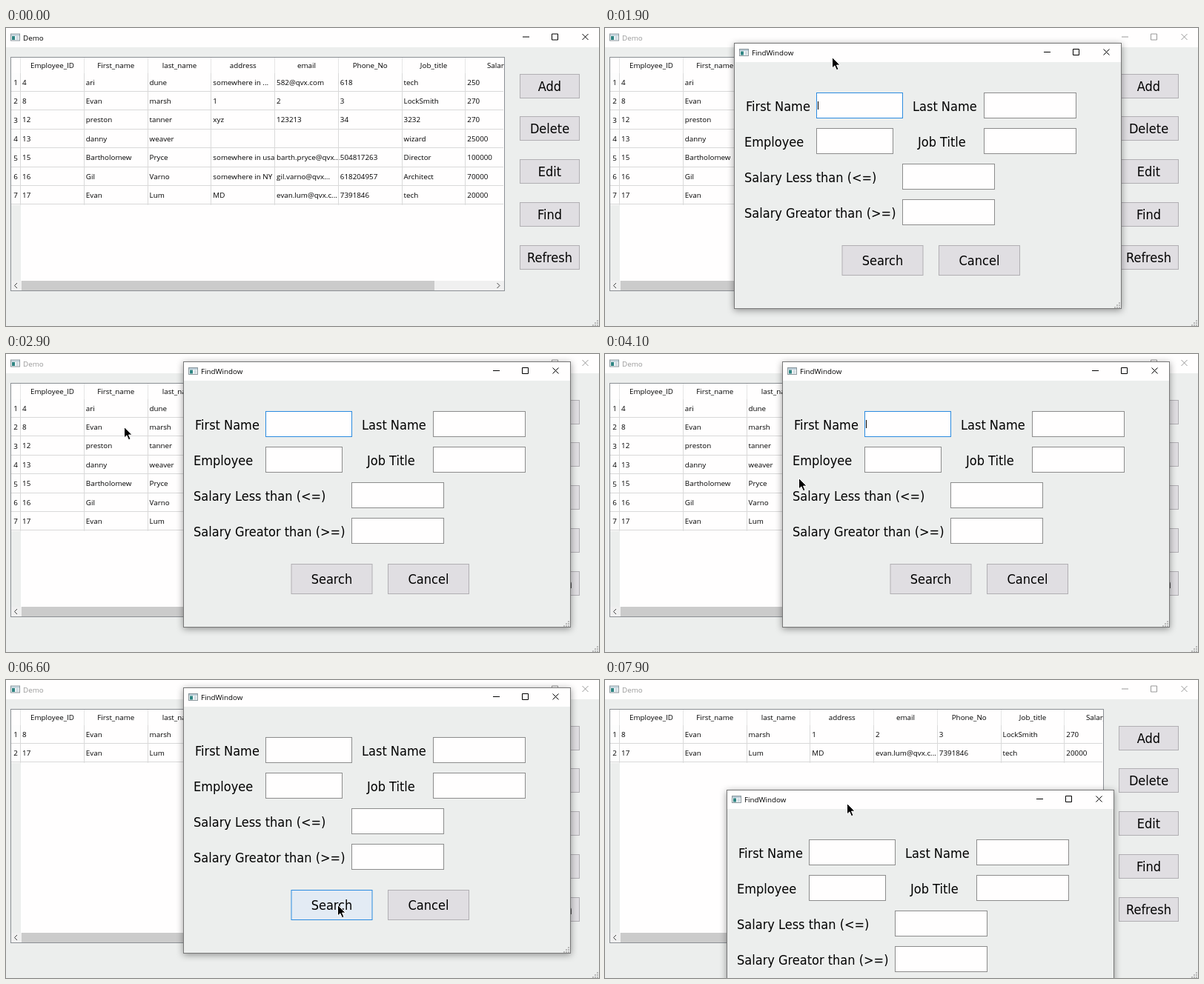
An HTML page that plays this animation: 800x402 px, repeating every 8000 ms.

```html
<!DOCTYPE html>
<html lang="en">
<head>
<meta charset="utf-8">
<title>Demo</title>
<style>
  html, body { margin: 0; width: 100%; height: 100%; overflow: hidden; background: #eceeed; }
  svg { display: block; }
  text { white-space: pre; }
  .small { font: 9.8px "Open Sans", "Noto Sans", sans-serif; }
  .big { font: 18px "DejaVu Sans Condensed", "Noto Sans", sans-serif; }
  .typed { font: 8.5px "DejaVu Sans Condensed", "Noto Sans", sans-serif; }
  .mid { text-anchor: middle; }
  .shadow { filter: drop-shadow(0 2px 5px rgba(0, 0, 0, .4)); }
</style>
</head>
<body>
<svg id="stage" width="800" height="402" viewBox="0 0 800 402"></svg>
<script>
const LOOP = 8000, STEP = 100;
const OPEN = 700, TYPE = 5000, CLICK = 6300, FILTER = 6500, BLINK = 530;
const BLUE = '#2b8be0', EDGE = '#8c8c8c', BUTTON = '#e0dee2', BUTTON_EDGE = '#b1afb3';
const PAPER = '#fffefe', FACE = '#eceeed', TYPED = 'Evan';

const HEADERS = ['Employee_ID', 'First_name', 'last_name', 'address', 'email', 'Phone_No', 'Job_title', 'Salary'];
const ROWS = [
  ['4', 'ari', 'dune', 'somewhere in ...', '582@qvx.com', '618', 'tech', '250'],
  ['8', 'Evan', 'marsh', '1', '2', '3', 'LockSmith', '270'],
  ['12', 'preston', 'tanner', 'xyz', '123213', '34', '3232', '270'],
  ['13', 'danny', 'weaver', '', '', '', 'wizard', '25000'],
  ['15', 'Bartholomew', 'Pryce', 'somewhere in usa', 'barth.pryce@qvx...', '504817263', 'Director', '100000'],
  ['16', 'Gil', 'Varno', 'somewhere in NY', 'gil.varno@qvx...', '618204957', 'Architect', '70000'],
  ['17', 'Evan', 'Lum', 'MD', 'evan.lum@qvx.c...', '7391846', 'tech', '20000']
];

// dialog drags: time, x, y
const DRAG = [
  [1800, 139, 22], [1900, 174, 20], [2300, 239, 10],
  [7200, 239, 10], [7500, 213, 62], [7900, 164, 148]
];
// pointer moves, measured from the dialog corner: start, end, x, y
const MOVES = [
  [100, 400, 597, 234], [600, 1000, 215, 159], [1000, 1700, 133, 20], [2300, 2900, -79, 89],
  [3000, 3500, -89, 220], [3700, 4600, 180, 71], [5800, 6200, 209, 294], [6600, 7100, 163, 19]
];

const stage = document.getElementById('stage');

function add(parent, tag, attrs = {}, text) {
  const el = document.createElementNS('http://www.w3.org/2000/svg', tag);
  for (const k in attrs) el.setAttribute(k, attrs[k]);
  if (text !== undefined) el.textContent = text;
  return parent.appendChild(el);
}
const label = (p, x, y, s, cls = 'small', fill = '#000') => add(p, 'text', { x, y, class: cls, fill }, s);
const rect = (p, x, y, width, height, fill, stroke = 'none') =>
  add(p, 'rect', { x, y, width, height, fill, stroke });
const path = (p, d, stroke, fill = 'none') => add(p, 'path', { d, stroke, fill });
const show = (el, on) => el.setAttribute('visibility', on ? 'visible' : 'hidden');
const move = (el, x, y) => el.setAttribute('transform', `translate(${x} ${y})`);

function button(p, x, y, w, h, s) {
  const box = rect(p, x + .5, y + .5, w, h, BUTTON, BUTTON_EDGE);
  label(p, x + w / 2 + .5, y + h / 2 + 7, s, 'big mid');
  return box;
}

function titleBar(p, x, y, name, controls) {
  rect(p, x + .5, y - 4.5, 12, 9, '#f4f7f8', '#8b979d');
  rect(p, x + 1, y - 4, 11, 2, '#b9cbd6');
  rect(p, x + 2, y - 1.5, 4, 5, '#2f8583');
  rect(p, x + 7.5, y - 1.5, 3.5, 5, '#d3dde4');
  const g = add(p, 'g', { color: '#000' });
  label(g, x + 17, y + 4, name, 'small', 'currentColor');
  const c = controls, t = y - 4.5;
  path(g, `M${c} ${y - .5}h9M${c + 39.5} ${t}h8v8h-8zM${c + 80.5} ${t}l8 8m0-8l-8 8`, 'currentColor');
  return g;
}

function grip(p, x, y) {
  for (let r = 0; r < 3; r++)
    for (let c = 0; c <= r; c++) rect(p, x - 2 - c * 3, y - 8 + r * 3, 2, 2, '#b8b8b8');
}

const colX = c => 19.6 + 85.75 * c;
const colLine = (p, c, top, end, stroke) => path(p, `M${Math.floor(colX(c)) + .5} ${top}V${end}`, stroke);

function tableRows(p, list) {
  const g = add(p, 'g'), top = 61, pitch = 25.4, end = top + pitch * list.length;
  rect(g, 7, top, 13, end - top, '#fdfdfd');
  list.forEach((cells, r) => {
    const y = top + pitch * r;
    label(g, 13, y + 16, r + 1, 'small mid');
    cells.forEach((s, c) => label(g, colX(c) + 2.5, y + 15.6, s));
    path(g, `M7 ${Math.floor(y + pitch) - .5}H671`, '#d9d9d9');
  });
  HEADERS.forEach((_, c) => colLine(g, c, top, end, '#d9d9d9'));
  return g;
}

// main window
rect(stage, 0, 0, 800, 402, FACE);
rect(stage, 0, 0, 800, 26, PAPER);
const mainTitle = titleBar(stage, 6, 12.5, 'Demo', 697);
grip(stage, 799, 402);
rect(stage, 6.5, 39.5, 666, 315, PAPER, '#8b8f94');
const view = add(stage, 'svg', { x: 7, y: 40, width: 665, height: 314, viewBox: '7 40 665 314' });
rect(view, 7, 61, 13, 280, FACE);
HEADERS.forEach((s, c) => {
  label(view, colX(c) + 42.9, 54, s, 'small mid');
  colLine(view, c, 40, 61, '#e6e6e6');
});
const allRows = tableRows(view, ROWS);
const foundRows = tableRows(view, ROWS.filter(r => r[1] === TYPED));
rect(view, 7, 341, 665, 13, '#f0f0f0');
rect(view, 21, 341, 557, 13, '#cbcbcb');
path(view, 'M15 344l-3.5 3.5 3.5 3.5M662.5 344l3.5 3.5-3.5 3.5', '#444');
const findButton = ['Add', 'Delete', 'Edit', 'Find', 'Refresh']
  .map((s, i) => button(stage, 693, Math.round(61.6 + 57.8 * i), 80, 32, s))[3];

// find dialog
const dialog = add(stage, 'g');
add(dialog, 'rect', { width: 523, height: 359, fill: FACE, class: 'shadow' });
rect(dialog, 0, 0, 523, 26, PAPER);
titleBar(dialog, 7, 13, 'FindWindow', 418);
grip(dialog, 521, 358);
rect(dialog, .5, .5, 522, 358, 'none', '#777');

function field(row, s, labelX, x, w = 124) {
  const y = 67 + 48 * row;
  label(dialog, labelX, y + 24.5, s, 'big');
  return rect(dialog, x + .5, y + .5, w, 34, PAPER, EDGE);
}
const firstField = field(0, 'First Name', 16, 111, 116);
field(0, 'Last Name', 241, 337);
field(1, 'Employee', 14, 111, 103);
field(1, 'Job Title', 248, 337);
field(2, 'Salary Less than (<=)', 14, 227);
field(3, 'Salary Greator than (>=)', 14, 227);

const [searchButton] = ['Search', 'Cancel'].map((s, i) => button(dialog, 145.5 + 130.5 * i, 273, 109, 40, s));
const entry = label(dialog, 112.5, 87, '', 'typed');
const caret = rect(dialog, 113, 79, 1, 11, '#000');

// pointers
const arrow = path(stage, 'M-.5 -.5V14L2.9 10.9 5.5 16.7 8 15.6 5.5 10.1H10.1Z', '#fff', '#000');
const beam = add(stage, 'g');
const BEAM = 'M-3 -6.5h2.5l.5 .7.5-.7h2.5M0 -6V6M-3 6.5h2.5l.5-.7.5 .7h2.5';
path(beam, BEAM, '#fff').setAttribute('stroke-width', 2.4);
path(beam, BEAM, '#000');

const clamp = f => Math.max(0, Math.min(1, f));
const mix = (a, b, f) => a + (b - a) * f;
const smooth = f => f * f * (3 - 2 * f);

function dialogAt(t) {
  let [, x, y] = DRAG[0];
  for (let i = 1; i < DRAG.length; i++) {
    const from = DRAG[i - 1][0], [to, toX, toY] = DRAG[i];
    const f = clamp((t - from) / (to - from));
    x = mix(x, toX, f);
    y = mix(y, toY, f);
  }
  return [Math.round(x), Math.round(y)];
}

function pointerAt(t) {
  let x = 583, y = 296;
  for (const [from, to, toX, toY] of MOVES) {
    const f = smooth(clamp((t - from) / (to - from)));
    x = mix(x, toX, f);
    y = mix(y, toY, f);
  }
  return [Math.round(x), Math.round(y)];
}

function paint(box, fill, stroke) {
  box.setAttribute('fill', fill);
  box.setAttribute('stroke', stroke);
}
const paintButton = (box, hover, edge = BUTTON_EDGE) =>
  paint(box, hover ? '#e3ebf4' : BUTTON, hover ? BLUE : edge);

function draw(t) {
  const open = t >= OPEN, found = t >= FILTER, focused = t < CLICK;
  const [x, y] = dialogAt(t), [dx, dy] = pointerAt(t);
  const over = (l, top, w, h) => dx > l && dx < l + w && dy > top && dy < top + h;
  const inField = open && over(111, 67, 117, 35);

  mainTitle.setAttribute('color', open ? '#999' : '#000');
  show(allRows, !found);
  show(foundRows, found);
  show(dialog, open);
  move(dialog, x, y);

  paintButton(findButton, !open && over(554, 213, 80, 33), open && t < 1200 ? '#8fabd6' : BUTTON_EDGE);
  paintButton(searchButton, over(145, 273, 110, 41));
  paint(firstField, PAPER, inField ? '#444' : focused ? BLUE : EDGE);

  entry.textContent = found ? '' : TYPED.slice(0, Math.max(0, (t - TYPE) / 100 + 1));
  const typing = t >= TYPE && t < TYPE + 900;
  const blink = t > 1100 && (t - 820) % (2 * BLINK) < BLINK;
  show(caret, open && focused && (typing || blink));
  caret.setAttribute('x', 113 + entry.getComputedTextLength());

  show(arrow, t >= 100 && !inField);
  show(beam, inField);
  for (const p of [arrow, beam]) move(p, x + dx, y + dy);
}

const start = performance.now();
function tick() {
  const t = (performance.now() - start) % LOOP;
  draw(Math.floor(t / STEP) * STEP);
  requestAnimationFrame(tick);
}
tick();
</script>
</body>
</html>
```
